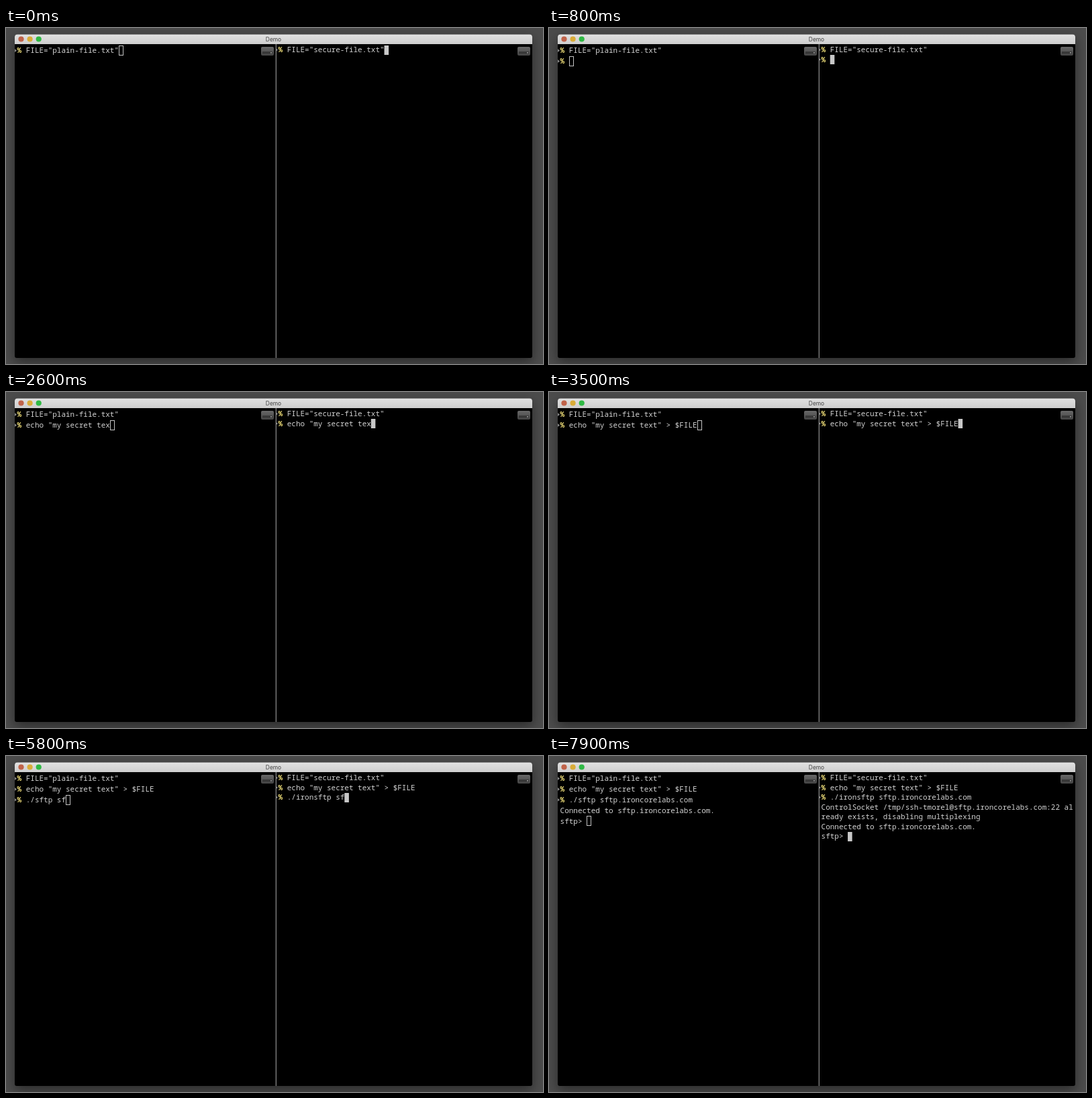
These frames come from a looping animation (800 px wide and 500 px high, 8 s). An HTML page with a canvas:

```html
<!DOCTYPE html>
<html>
<head>
<meta charset="utf-8">
<title>Demo</title>
<style>
  html, body { margin: 0; width: 100%; height: 100%; overflow: hidden; background: #4a4a4a; }
  canvas { display: block; }
</style>
</head>
<body>
<canvas id="stage" width="800" height="500"></canvas>
<script>
const ctx = document.getElementById('stage').getContext('2d');
const LOOP = 8000, CHAR = 6.58;
const MONO = '10.97px "Noto Sans Mono", monospace';
const HOST = 'sftp.ironcorelabs.com';
const ECHO = 'echo "my secret text" > $FILE';

// Typing progress as [ms, characters]
const echoKeys = [[900, 0], [1600, 7], [2700, 20], [2800, 21], [2900, 21], [3000, 22],
  [3100, 24], [3200, 24], [3300, 26], [3500, 29]];
const commandKeys = [[4300, 0], [5000, 7], [5700, 7], [5800, 9], [6600, 22], [7000, 28]];

const panes = [
  {
    x: 16.6, top: 26, pitch: 15.8, baseline: 11.3, iconX: 380, hollow: true,
    file: 'plain-file.txt', program: './sftp ',
    reply: ['Connected to ' + HOST + '.', 'sftp> ']
  },
  {
    x: 405.6, top: 25.8, pitch: 14.5, baseline: 10.4, iconX: 762, hollow: false,
    file: 'secure-file.txt', program: './ironsftp ',
    reply: ['ControlSocket /tmp/ssh-tmorel@' + HOST + ':22 al',
      'ready exists, disabling multiplexing', 'Connected to ' + HOST + '.', 'sftp> ']
  }
];

function progress(t, keys) {
  if (t <= keys[0][0]) return keys[0][1];
  for (let i = 1; i < keys.length; i++) {
    const [t0, n0] = keys[i - 1], [t1, n1] = keys[i];
    if (t <= t1) return n0 + (n1 - n0) * (t - t0) / (t1 - t0);
  }
  return keys[keys.length - 1][1];
}

function roundRect(x, y, w, h, radii, fill) {
  ctx.beginPath();
  ctx.roundRect(x, y, w, h, radii);
  ctx.fillStyle = fill;
  ctx.fill();
}

function vertical(y0, y1, from, to) {
  const g = ctx.createLinearGradient(0, y0, 0, y1);
  g.addColorStop(0, from);
  g.addColorStop(1, to);
  return g;
}

function drawWindow() {
  ctx.fillStyle = '#4c4c4c';
  ctx.fillRect(0, 0, 800, 500);
  ctx.save();
  ctx.shadowColor = 'rgba(0,0,0,.45)';
  ctx.shadowBlur = 18;
  ctx.shadowOffsetY = 6;
  roundRect(13, 9.5, 771, 481.5, [4, 4, 3, 3], '#000');
  ctx.restore();
  roundRect(13, 9.5, 771, 14.5, [4, 4, 0, 0], vertical(9, 24, '#e2e2e2', '#cecece'));
  ['#c0634a', '#d9ac38', '#2fb944'].forEach((color, i) =>
    roundRect(18.4 + 13.1 * i, 12.4, 8.2, 8.2, 4.1, color));
  ctx.font = '8.4px Inter, sans-serif';
  ctx.textAlign = 'center';
  ctx.fillStyle = '#444';
  ctx.fillText('Demo', 398.5, 20);
  ctx.textAlign = 'left';
  ctx.fillStyle = '#858585';
  ctx.fillRect(401.7, 24, 1.3, 467);
}

function drawIcon(x) {
  roundRect(x, 28, 19, 13, 2, vertical(28, 41, '#686868', '#454545'));
  ctx.fillStyle = '#383838';
  ctx.fillRect(x + 2, 35, 15, 3.5);
  ctx.fillStyle = '#999';
  ctx.fillRect(x + 14, 36, 2, 1.5);
}

function paneLines(pane, t) {
  const lines = ['% FILE="' + pane.file + '"'];
  if (t >= 500) lines.push('% ' + ECHO.slice(0, Math.round(progress(t, echoKeys))));
  if (t >= 4200) {
    const n = progress(t, commandKeys);
    const extra = (pane.program.length - 7) * Math.min(1, n / 7);
    lines.push('% ' + (pane.program + HOST).slice(0, Math.round(n + extra)));
  }
  if (t >= 7900) lines.push(...pane.reply);
  else if (t >= 7800) lines.push('');
  return lines;
}

function drawPane(pane, t) {
  const lines = paneLines(pane, t);
  lines.forEach((line, i) => {
    const top = pane.top + i * pane.pitch, y = top + pane.baseline;
    let x = pane.x;
    if (line[0] === '%') {
      ctx.fillStyle = '#999';
      ctx.beginPath();
      ctx.moveTo(x - 3.4, y - 6);
      ctx.lineTo(x - 0.8, y - 3.7);
      ctx.lineTo(x - 3.4, y - 1.4);
      ctx.fill();
      ctx.font = 'bold ' + MONO;
      ctx.fillStyle = '#f0df78';
      ctx.fillText('%', x, y);
      x += 2 * CHAR;
      line = line.slice(2);
    }
    ctx.font = MONO;
    ctx.fillStyle = '#d2d2d2';
    ctx.fillText(line, x, y);
    if (i < lines.length - 1) return;

    x += line.length * CHAR;
    if (pane.hollow) {
      ctx.strokeStyle = '#c4c4c4';
      ctx.lineWidth = 1;
      ctx.strokeRect(Math.round(x) + 0.5, Math.round(top) + 0.5, 6, 14);
    } else {
      ctx.fillStyle = '#c8c8c8';
      ctx.fillRect(x, Math.round(top), CHAR, 14);
    }
  });
  drawIcon(pane.iconX);
}

function draw() {
  const t = Math.floor(performance.now() % LOOP / 100) * 100;
  drawWindow();
  panes.forEach(pane => drawPane(pane, t));
  requestAnimationFrame(draw);
}
draw();
</script>
</body>
</html>
```
